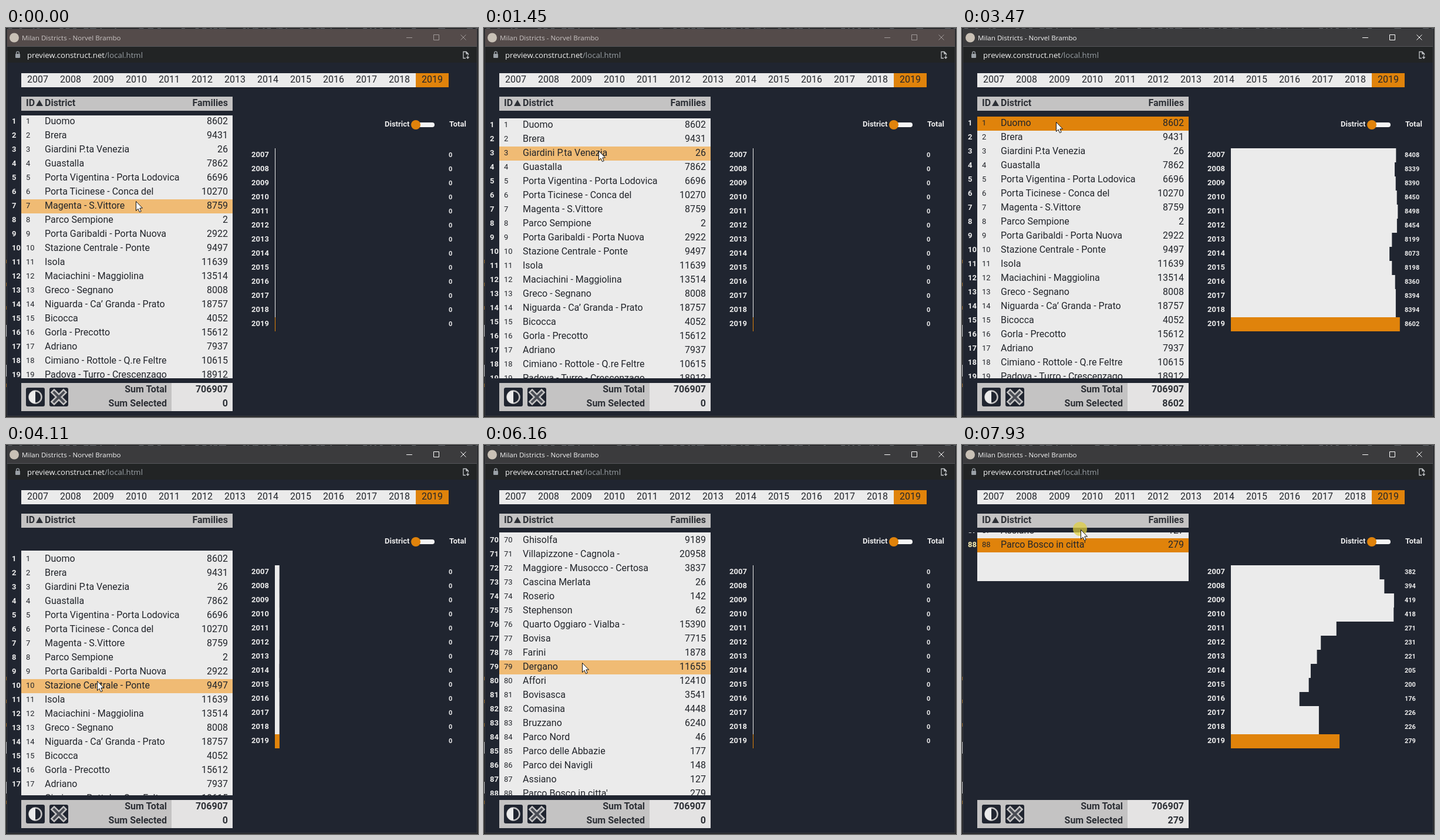
These frames come from a looping animation (804 px wide and 663 px high, 8 s). An HTML page:

```html
<!DOCTYPE html>
<html lang="en">
<head>
<meta charset="utf-8">
<title>Milan Districts</title>
<style>
html, body { margin: 0; width: 100%; height: 100%; overflow: hidden; background: #202530; }
svg { display: block; }
text { font-family: Roboto, sans-serif; font-size: 16px; fill: #22252b; white-space: pre; }
.ui { font-family: "Open Sans", sans-serif; }
.b { font-weight: 700; fill: #2d3036; }
.s { font-size: 13px; }
.xs { font-size: 11px; }
.w { fill: #ececec; }
</style>
</head>
<body>
<svg id="stage" width="804" height="663" viewBox="0 0 804 663">
  <defs><clipPath id="list"><rect x="0" y="149" width="386" height="448"/></clipPath></defs>
</svg>
<script>
const LOOP = 8000, STEP = 80, ROW = 24, TOP = 148;
const PAPER = '#ebebeb', ORANGE = '#e0830b', HOVER = '#f0bb74', GREY = '#c4c3c3', DARK = '#202530';
const stage = document.getElementById('stage');

function set(el, attrs) {
  for (const k in attrs) el.setAttribute(k, attrs[k]);
}
function add(tag, attrs, parent = stage) {
  const el = document.createElementNS('http://www.w3.org/2000/svg', tag);
  set(el, attrs);
  parent.appendChild(el);
  return el;
}
const rect = (x, y, width, height, fill, parent, rx = 0) =>
  add('rect', { x, y, width, height, fill, rx }, parent);
function label(str, x, y, cls = '', anchor = 'start', parent = stage) {
  const el = add('text', { x, y, class: cls, 'text-anchor': anchor }, parent);
  el.textContent = str;
  return el;
}
function write(el, str) {
  if (el.textContent !== String(str)) el.textContent = str;
}
const noise = i => Math.abs(Math.sin(i * 12.9898) * 43758.5453) % 1;

// District name and families; a missing count is made up from the seed
const districts = ("Duomo 8602|Brera 9431|Giardini P.ta Venezia 26|Guastalla 7862|" +
  "Porta Vigentina - Porta Lodovica 6696|Porta Ticinese - Conca del 10270|Magenta - S.Vittore 8759|" +
  "Parco Sempione 2|Porta Garibaldi - Porta Nuova 2922|Stazione Centrale - Ponte 9497|Isola 11639|" +
  "Maciachini - Maggiolina 13514|Greco - Segnano 8008|Niguarda - Ca’ Granda - Prato 18757|" +
  "Bicocca 4052|Gorla - Precotto 15612|Adriano 7937|Cimiano - Rottole - Q.re Feltre 10615|" +
  "Padova - Turro - Crescenzago 18912|Loreto - Casoretto - Nolo|Buenos Aires - Porta Venezia|" +
  "Citta' Studi|Lambrate - Ortica|Parco Forlanini - Cavriano|Corsica|XXII Marzo|Porta Romana|" +
  "Umbria - Molise - Calvairate|Ortomercato|Taliedo - Morsenchio - Q.re|Monlue' - Ponte Lambro|" +
  "Triulzo Superiore|Rogoredo - Santa Giulia|Chiaravalle|Lodi - Corvetto|Scalo Romana|Morivione|" +
  "Vigentino - Q.re Fatima|Quintosole|Ronchetto delle Rane|Gratosoglio - Q.re Missaglia|" +
  "Stadera - Chiesa Rossa - Q.re|Tibaldi|Porta Ticinese - Conchetta|Moncucco - San Cristoforo|" +
  "Barona|Cantalupa|Ronchetto sul Naviglio|Giambellino|Porta Genova|Porta Magenta|Bande Nere|" +
  "Lorenteggio|Muggiano|Baggio - Q.re degli Olmi|Forze Armate|San Siro|De Angeli - Monte Rosa|" +
  "Tre Torri|Stadio - Ippodromi|Quarto Cagnino|Quinto Romano|Figino|Trenno|Gallaratese - Q.re San|" +
  "QT8|Portello|Pagano|Sarpi|Ghisolfa 9189|Villapizzone - Cagnola - 20958|" +
  "Maggiore - Musocco - Certosa 3837|Cascina Merlata 26|Roserio 142|Stephenson 62|" +
  "Quarto Oggiaro - Vialba - 15390|Bovisa 7715|Farini 1878|Dergano 11655|Affori 12410|" +
  "Bovisasca 3541|Comasina 4448|Bruzzano 6240|Parco Nord 46|Parco delle Abbazie 177|" +
  "Parco dei Navigli 148|Assiano 127|Parco Bosco in citta' 279").split('|').map((line, i) => {
    const [, name, count] = line.match(/^(.*?)(?: (\d+))?$/);
    return { name, families: count || Math.round(300 + noise(i) * 17000) };
  });
const COUNT = districts.length;
const series = str => str.split(' ').map(Number);
const picks = [
  { row: 0, on: 2230, off: 3510, data: series('8408 8339 8390 8450 8498 8454 8199 8073 8198 8360 8394 8394 8602') },
  { row: 87, on: 7370, off: LOOP, data: series('382 394 419 418 271 231 221 205 200 176 226 226 279') }
];

// Window frame
rect(0, 0, 804, 663, '#191a1c');
for (let i = 0; i < 60; i++) rect(noise(i + 1) * 800, 0, 2 + noise(i + 90) * 5, 1, '#55585d');
for (const y of [395, 434, 474, 606]) rect(0, y, 1, 6, '#8a5a18');
for (const y of [506, 574]) rect(0, y, 1, 20, '#b8b8b8');
rect(1, 1, 802, 661, '#3d3f43');
const bar = rect(2, 2, 800, 29, '#544b4a');
rect(2, 31, 800, 29, '#222425');
rect(2, 31, 800, 1, '#55575a');
rect(2, 59, 800, 602, DARK);
add('circle', { cx: 14, cy: 16.5, r: 8, fill: '#c9c1b6' });
const title = label('Milan Districts - Norvel Brambo', 27, 21, 'ui');
title.style.fontSize = '11.6px';
const buttons = add('path', {
  d: 'M682 16.5h10M728.5 11.5h9v9h-9zM774.5 11.5l9 9M783.5 11.5l-9 9', fill: 'none'
});
rect(16, 44, 8, 7, '#9aa0a6', stage, 1);
add('path', { d: 'M17.7 44v-1.6a2.3 2.3 0 0 1 4.6 0V44', fill: 'none', stroke: '#9aa0a6', 'stroke-width': 1.4 });
const url = label('', 36, 51, 'ui');
url.style.fontSize = '13.2px';
for (const [str, fill] of [['preview.construct.net', '#f1f1f1'], ['/local.html', '#9aa0a6']])
  add('tspan', { fill }, url).textContent = str;
add('path', {
  d: 'M783 51.5h-4v-11h5l3.5 3.5v2M784 40.5v3.5h3.5M786.5 46.5v5M784.3 49.5l2.2 2.4l2.2-2.4',
  fill: 'none', stroke: '#c3c6c9', 'stroke-width': 1.3
});

// Year tabs and table header
rect(26, 77, 672, 24, PAPER);
rect(698, 77, 56, 24, ORANGE);
for (let i = 0; i < 13; i++) label(2007 + i, 54 + i * 56, 93, '', 'middle');
rect(26, 117, 360, 24, GREY);
label('ID', 34, 133, 'b');
add('path', { d: 'M51 133L57 122.5L63 133z', fill: '#2d3036' });
label('District', 66, 133, 'b');
label('Families', 378, 133, 'b', 'end');

// Scrolling list
const list = add('g', { 'clip-path': 'url(#list)' });
const sheet = rect(26, TOP, 360, 10, PAPER, list);
const rows = Array.from({ length: 21 }, () => {
  const g = add('g', {}, list);
  return {
    g,
    back: rect(26, 0, 360, ROW, 'none', g),
    num: label('', 10, 15, 's b w', 'start', g),
    id: label('', 34, 15, 's', 'start', g),
    name: label('', 66, 16, '', 'start', g),
    value: label('', 378, 16, '', 'end', g)
  };
});

// Footer
rect(26, 605, 256, 48, GREY);
rect(282, 605, 104, 48, '#e4e3e3');
for (const x of [34, 74]) rect(x, 613, 32, 32, DARK, stage, 3);
add('circle', { cx: 50, cy: 629, r: 10.5, fill: 'none', stroke: GREY, 'stroke-width': 2.5 });
add('path', { d: 'M50 618a11 11 0 0 0 0 22z', fill: PAPER });
for (const [stroke, width] of [[GREY, 9], ['#4a4d55', 4]])
  add('path', { d: 'M82 621l16 16M98 621l-16 16', stroke, 'stroke-width': width, 'stroke-linecap': 'square' });
label('Sum Total', 274, 621, 'b', 'end');
label('706907', 378, 621, 'b', 'end');
label('Sum Selected', 274, 645, 'b', 'end');
const sum = label('0', 378, 645, 'b', 'end');

// Chart
label('District', 645, 168, 's b w');
label('Total', 755, 168, 's b w');
rect(694, 161, 36, 8, '#f4f4f4', stage, 4);
add('circle', { cx: 698, cy: 165, r: 8, fill: ORANGE });
const bars = Array.from({ length: 13 }, (_, i) => {
  const y = 205 + i * ROW;
  label(2007 + i, 418, y + 15, 's b w');
  return {
    box: rect(458, y, 1, ROW, i < 12 ? PAPER : ORANGE),
    value: label('0', 754, y + 15, 'xs b w')
  };
});

// Pointer
const halo = add('circle', { r: 12, fill: '#e0d040', 'fill-opacity': 0.72 });
const pointer = add('path', {
  d: 'M.5 .5V16.5L4 13L6.5 18.7L9.2 17.5L6.8 12H11.5z', fill: '#fff', stroke: '#111'
});

// Motion: the screen refreshes every STEP, counted anew after each rest
const bursts = [[4930, 2], [5260, 2], [5510, 3], [5840, 5]];
const starts = [250, 1860, 3470, 4760, ...bursts.map(b => b[0]), 6330];
function tick(t) {
  const from = starts.filter(s => s <= t).pop();
  return from ? from + Math.floor((t - from) / STEP) * STEP : 0;
}
const part = (t, a, b) => Math.min(1, Math.max(0, (t - a) / (b - a)));
const ease = u => u * u * (3 - 2 * u);
const bump = (t, from, span, height) => height * Math.sin(Math.PI * part(t, from, from + span)) ** 2;

// Pointer legs: begin, end, x, y
const legs = [[250, 1450, 195, 209], [1690, 2180, 172, 160], [2260, 2500, 167, 422], [2740, 3470, 160, 160],
  [3550, 3790, 143, 436], [3790, 4350, 163, 380], [4590, 4760, 167, 371], [6330, 7130, 155, 566],
  [7370, 7930, 202, 144]];
function mouse(t) {
  let x = 221, y = 295;
  for (const [a, b, toX, toY] of legs) {
    const u = ease(part(t, a, b));
    x += (toX - x) * u;
    y += (toY - y) * u;
  }
  return { x: Math.round(x), y: Math.round(y) };
}

// Wheel: three rows on the first tick, then six each
function wheelRows(t) {
  let n = 0;
  for (const [from, ticks] of bursts)
    if (t >= from) n += Math.min(ticks, Math.floor((t - from) / STEP) + 1);
  return n ? n * 6 - 3 : 0;
}
function offset(t) {
  return 3 * part(t, 250, 1050) + bump(t, 250, 1440, 12)
    + bump(t, 2260, 810, 47) + bump(t, 3550, 810, 47)
    - wheelRows(t) * ROW
    - 20 * ease(part(t, 6330, 7130)) - 404 * ease(part(t, 7370, 7930));
}
// Hover trails one tick behind free motion and is fixed while wheeling or dragging
function hovered(t) {
  const wheeling = t >= 4930 && t < 6330;
  const seen = wheeling ? t : Math.min(t - STEP, 7370);
  return Math.floor((mouse(seen).y - TOP - offset(seen)) / ROW);
}

function drawList(t, selected, pressed) {
  const off = offset(t), hover = hovered(t);
  const rowEnd = TOP + off + COUNT * ROW;
  const top = Math.max(149, Math.round(TOP + off * 11 / 12));
  const end = Math.min(597, Math.round(rowEnd + 8 + Math.max(0, 597 - rowEnd) / 10));
  set(sheet, { y: top, height: end - top });
  const first = Math.max(0, Math.floor(-off / ROW));
  rows.forEach((r, k) => {
    const i = first + k;
    r.g.style.display = i < COUNT ? '' : 'none';
    if (i >= COUNT) return;
    set(r.g, { transform: `translate(0 ${Math.round(TOP + off + i * ROW)})` });
    set(r.back, { fill: i === selected ? ORANGE : i === hover ? HOVER : 'none' });
    r.num.style.fill = i === selected && pressed ? '#fbeeb0' : '';
    write(r.num, i + 1);
    write(r.id, i + 1);
    write(r.name, districts[i].name);
    write(r.value, districts[i].families);
  });
}

function drawChart(t, selected) {
  const { on, off, data } = picks.filter(p => t >= p.on).pop() || picks[0];
  const left = from => Math.exp(-Math.max(0, t - from) / 167);
  const grow = t < off ? 1 - left(on) : left(off);
  const max = Math.max(...data);
  bars.forEach((b, i) => {
    set(b.box, { width: Math.max(1, 288 * grow * data[i] / max) });
    write(b.value, selected < 0 ? 0 : data[i]);
  });
  write(sum, selected < 0 ? 0 : districts[selected].families);
}

function draw(time) {
  const t = tick(time);
  const pick = picks.find(p => t >= p.on && t < p.off);
  const selected = pick ? pick.row : -1;
  const held = from => t >= from && t < from + 190;
  const pressed = held(picks[0].on) || held(picks[0].off) || t >= picks[1].on;
  const active = t >= picks[0].on;
  set(bar, { fill: active ? '#3b3b3d' : '#544b4a' });
  title.style.fill = active ? '#f4f4f4' : '#c9c4c3';
  set(buttons, { stroke: active ? '#ffffff' : '#a09a99' });
  drawList(t, selected, pressed);
  drawChart(t, selected);
  const { x, y } = mouse(t);
  set(pointer, { transform: `translate(${x} ${y})` });
  set(halo, { cx: x - 1, cy: y - 1 });
  halo.style.display = pressed ? '' : 'none';
}

const start = performance.now();
function frame() {
  draw((performance.now() - start) % LOOP);
  requestAnimationFrame(frame);
}
frame();
</script>
</body>
</html>
```
